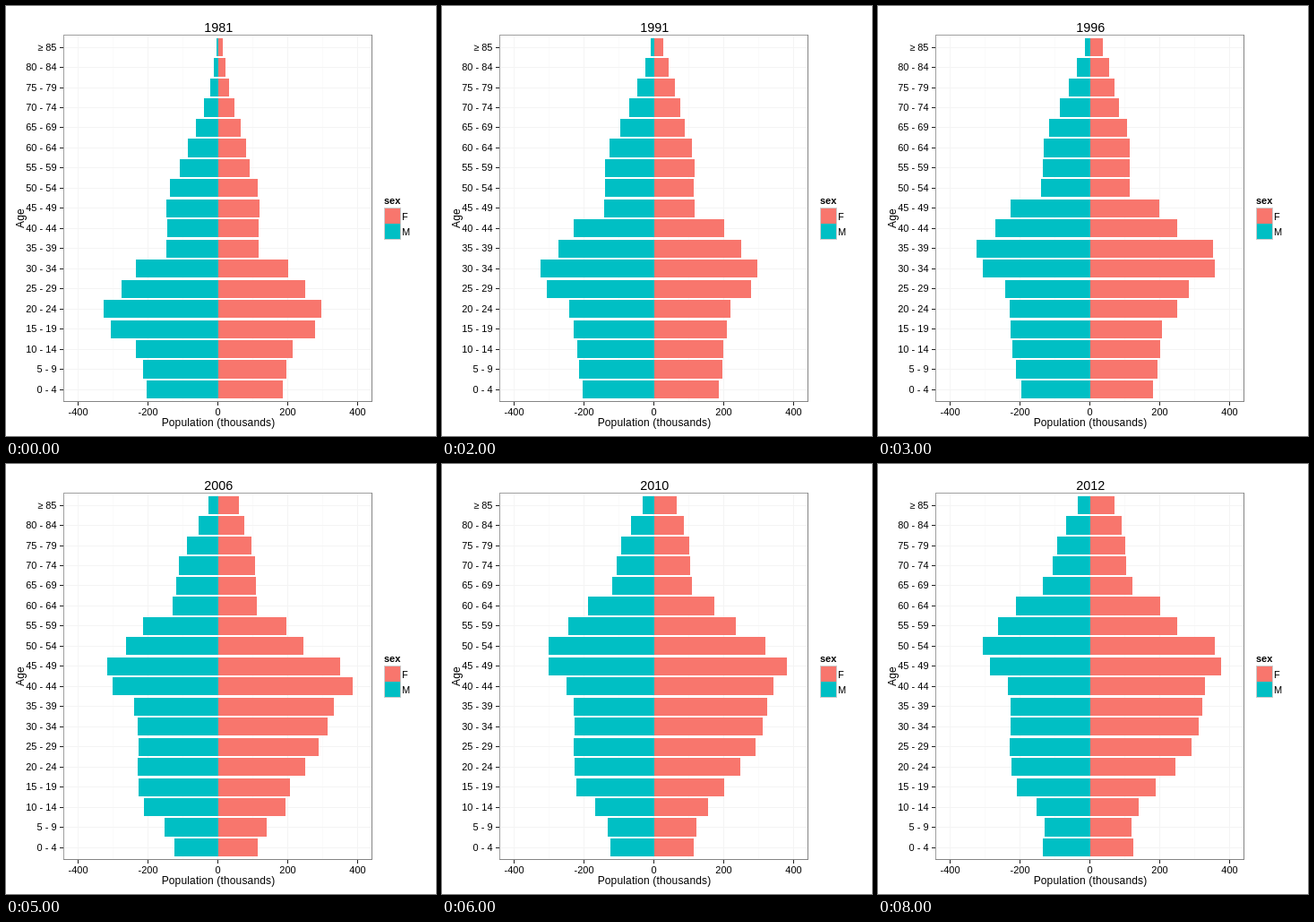
Recreate the animation shown at these times as an HTML page. Size 480x480 px, loop 9000 ms.

```html
<!DOCTYPE html>
<html lang="en">
<head>
<meta charset="utf-8">
<title>Population pyramid</title>
<style>
  html, body { margin: 0; width: 100%; height: 100%; overflow: hidden; background: #fff; }
  svg { display: block; width: 480px; height: 480px; }
  text { font-family: "Liberation Sans", Arial, sans-serif; font-size: 11px; fill: #000; }
  rect { shape-rendering: crispEdges; }
  .title { font-size: 14.4px; }
  .axis { font-size: 12px; letter-spacing: .15px; }
</style>
</head>
<body>
<svg id="stage" viewBox="0 0 480 480"></svg>
<script>
const FEMALE = '#F8766D', MALE = '#00BFC4';
const ROWS = 18, STEP = 22.47, MID = 237, HOLD = 1000;
const YEARS = [1981, 1986, 1991, 1996, 2001, 2006, 2010, 2011, 2012];
const stage = document.getElementById('stage');

function add(tag, attrs, text) {
  const el = document.createElementNS('http://www.w3.org/2000/svg', tag);
  for (const key in attrs) el.setAttribute(key, attrs[key]);
  if (text !== undefined) el.textContent = text;
  stage.appendChild(el);
  return el;
}
const box = (x, y, width, height, fill) => add('rect', { x, y, width, height, fill });
const label = (x, y, text, anchor = 'start', more = {}) =>
  add('text', { x, y, 'text-anchor': anchor, ...more }, text);

const clamp = (v, lo, hi) => Math.min(hi, Math.max(lo, v));

// Size of each five-year birth cohort, oldest first
const cohorts = [6, 10, 15, 22, 31, 39, 47, 57, 60, 58, 58, 92, 108,
  128, 120, 95, 90, 89, 90, 89, 86, 64, 54, 55, 75];

function cohortSize(c) {
  const i = Math.floor(c);
  return cohorts[i] + (cohorts[i + 1] - cohorts[i]) * (c - i);
}

// Ages are counted in five-year groups, 0 to 17
const survival = (age, loss) => 1 - loss * (age / 17) ** 5;
const childhood = age => 1 - 0.1 * Math.max(0, 1 - age / 3);

// Women per man: set by cohort, then raised by arrivals of young adults after 1991
function femaleRatio(c, age) {
  const native = 0.78 + 0.05 * Math.max(0, 6 - c) + clamp(0.07 * (c - 10), 0, 0.12);
  const stay = Math.max(0, Math.min(age, 6.6) - Math.max(3.4, 19 - c));
  return native + 0.58 * (1 - Math.exp(-0.6 * stay));
}

function barLengths(year, row) {
  const c = row + (year - YEARS[0]) / 5, age = ROWS - 1 - row;
  const size = cohortSize(c) * childhood(age);
  return {
    m: Math.round(size * survival(age, 0.72)),
    f: Math.round(size * survival(age, 0.3) * femaleRatio(c, age)),
  };
}

const rowTop = i => Math.round(35.95 + STEP * i);
const rowEnd = i => Math.round(56.17 + STEP * i);
const rowMid = i => Math.floor(46.06 + STEP * i);
const scaleX = v => Math.floor(236.5 + v * 0.391);

box(0, 0, 480, 480, '#fff');

// Grid
for (let v = -300; v <= 300; v += 200) box(scaleX(v), 33, 1, 408, '#fafafa');
for (let i = 0; i < ROWS; i++) box(65, rowMid(i), 343, 1, '#f4f4f4');
for (let v = -400; v <= 400; v += 200) box(scaleX(v), 33, 1, 408, '#f4f4f4');

// Bars
const bars = Array.from({ length: ROWS }, (_, i) => {
  const y = rowTop(i), h = rowEnd(i) - y;
  return { m: box(MID, y, 0, h, MALE), f: box(MID, y, 0, h, FEMALE) };
});

// Panel border
box(64, 32, 345, 1, '#a0a0a0');
box(64, 32, 1, 410, '#a0a0a0');
box(408, 32, 1, 410, '#858585');
box(64, 441, 345, 1, '#858585');

// Axes
for (let i = 0; i < ROWS; i++) {
  const age = 5 * (ROWS - 1 - i);
  box(60, rowMid(i), 4, 1, '#222');
  label(56.5, rowMid(i) + 4, i ? `${age} - ${age + 4}` : '≥ 85', 'end');
}
for (let v = -400; v <= 400; v += 200) {
  box(scaleX(v), 442, 1, 4, '#222');
  label(scaleX(v) + 0.5, 457, v, 'middle');
}
label(237, 469, 'Population (thousands)', 'middle', { class: 'axis' });
label(0, 0, 'Age', 'middle', { class: 'axis', transform: 'translate(20 237) rotate(-90)' });
const title = label(237.3, 29, '', 'middle', { class: 'title' });

// Legend
label(422, 221, 'sex', 'start', { 'font-weight': 'bold' });
box(422, 225, 19, 36, '#ccc');
[['F', FEMALE], ['M', MALE]].forEach(([name, color], i) => {
  const y = 226 + 17 * i;
  box(423, y, 17, 17, color);
  label(442, y + 13, name);
});

let shown = -1;
function show(n) {
  title.textContent = YEARS[n];
  bars.forEach((bar, row) => {
    const { m, f } = barLengths(YEARS[n], row);
    bar.m.setAttribute('x', MID - m);
    bar.m.setAttribute('width', m);
    bar.f.setAttribute('width', f);
  });
  shown = n;
}

const start = performance.now();
function tick() {
  const n = Math.floor((performance.now() - start) / HOLD) % YEARS.length;
  if (n !== shown) show(n);
  requestAnimationFrame(tick);
}
tick();
</script>
</body>
</html>
```
